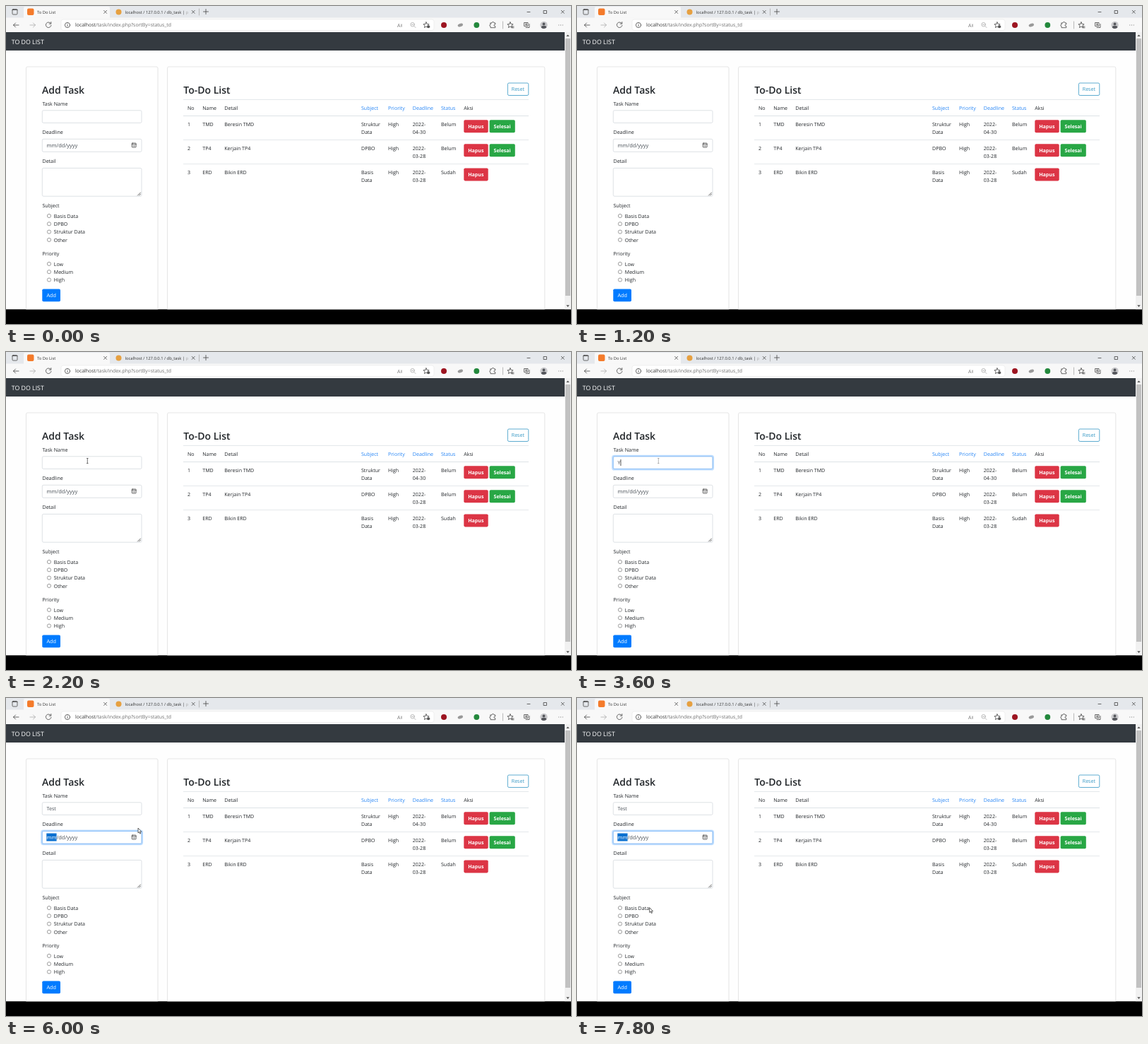
Write an HTML page that moves like this. It is 800x450 px and loops after 8 s.

```html
<!DOCTYPE html>
<html lang="en">
<head>
<meta charset="utf-8">
<title>To Do List</title>
<style>
  html, body { margin: 0; width: 100%; height: 100%; overflow: hidden; background: #000; }
  svg { display: block; width: 100%; height: 100%; }
  text { font: 7.05px "Open Sans", "Noto Sans", sans-serif; fill: #212529; text-rendering: geometricPrecision; white-space: pre; }
  .heading { font-size: 14px; font-weight: 600; }
  .link { fill: #2484f5; }
  .tab { font-size: 5.8px; fill: #333; }
  .url { font-size: 6.9px; fill: #6d6d6d; }
  .brand { font-size: 8.8px; fill: #fff; }
  .value { fill: #495057; }
  .date { font-size: 7.5px; fill: #495057; }
  .button { fill: #fff; font-weight: 700; }
  .line { fill: none; stroke: #444; stroke-width: .8; stroke-linecap: round; stroke-linejoin: round; }
  .pale { stroke: #aaa; }
  .card { fill: #fff; stroke: #dfdfdf; stroke-width: .8; }
  .field { fill: #fff; stroke: #ced4da; stroke-width: .7; }
  .radio { fill: #fff; stroke: #767676; stroke-width: .7; }
  .ring { fill: none; stroke: #007bff; stroke-opacity: .25; stroke-width: 2; }
  .edge { fill: none; stroke: #80bdff; stroke-width: .8; }
</style>
</head>
<body>
<svg viewBox="0 0 800 450" preserveAspectRatio="none">
  <rect width="800" height="429.5" fill="#fefefe"/>

  <g id="tabs">
    <rect width="800" height="17" fill="#e5e8ec"/>
    <path d="M25 17V3q0-2 2-2H145q2 0 2 2V17Z" fill="#f8f8f8"/>
    <rect class="line" x="9" y="4.5" width="7" height="7.5" rx="1.2"/>
    <path d="M9 5.5h7" class="line" stroke-width="1.6"/>
    <rect x="30" y="3.5" width="9.5" height="9.5" rx="2" fill="#f47b2b"/>
    <text class="tab" x="44" y="10.7">To Do List</text>
    <circle cx="159.5" cy="8.5" r="4" fill="#e6a041"/>
    <text class="tab" x="168.5" y="10.7">localhost / 127.0.0.1 / db_task | <tspan fill="#aaa">p</tspan></text>
    <path class="line" d="M138.6 6.4l4 4m0-4l-4 4M263.2 6.4l4 4m0-4l-4 4M279.5 8h7m-3.5-3.5v7"/>
    <path class="line pale" d="M273.5 4v9"/>
    <path class="line" stroke-width=".6" d="M738 8.5h4M761.5 6.5h4v4h-4zM786.3 6.3l4 4m0-4l-4 4"/>
  </g>

  <g id="toolbar">
    <rect y="16.5" width="800" height="21" fill="#f8f8f8"/>
    <rect x="78" y="19" width="528" height="15.5" rx="3" fill="#fff" stroke="#e8e8e8" stroke-width=".6"/>
    <path class="line" d="M18 27h-7.5m3-3l-3 3l3 3M63.3 24.5a3.8 3.8 0 1 0 .7 2.8M63.8 22.6v2.6h-2.6"/>
    <path class="line pale" d="M34 27h7.5m-3-3l3 3l-3 3"/>
    <circle class="line" cx="87" cy="27" r="3.6"/>
    <path class="line" d="M87 26.6v2M87 25v.1"/>
    <text class="url" x="98" y="29.4"><tspan fill="#333">localhost</tspan>/task/index.php?sortBy=status_td</text>
    <text class="url" x="554" y="29.8">A<tspan font-size="5" dy="-1.2">))</tspan></text>
    <circle class="line pale" cx="575.6" cy="26.2" r="2.8"/>
    <path class="line pale" d="M577.8 28.4l2.2 2.2M574.3 26.2h2.6"/>
    <path id="star" class="line" d="M595 22.8l1.2 2.7l2.9.3l-2.2 1.9l.7 2.9l-2.6-1.5l-2.6 1.5l.7-2.9l-2.2-1.9l2.9-.3z"/>
    <circle cx="598.2" cy="29.3" r="2" fill="#555"/>
    <circle cx="620" cy="27" r="4" fill="#9c1420"/>
    <ellipse cx="643.3" cy="27" rx="3.8" ry="2.2" fill="#999" transform="rotate(-20 643.3 27)"/>
    <circle cx="666.3" cy="27" r="3.9" fill="#23883c"/>
    <path class="line" d="M686 24h2q.3-1.6 1.5-1.6T691 24h1.8v2q-1.8 0-1.8 1.3t1.8 1.3v2.1H686v-2.1q-1.2 0-1.2-1.3T686 26z"/>
    <path class="line pale" d="M703.5 22v10"/>
    <use href="#star" x="119"/>
    <path class="line" d="M716 29h3m-3 1.8h3M734 23.5h5v5h-5zM736 30.5h5v-5M736.5 24.8v2.4m-1.2-1.2h2.4"/>
    <circle cx="761.5" cy="27" r="5.2" fill="#c9c9cc"/>
    <circle cx="761.5" cy="25.4" r="1.9" fill="#55575c"/>
    <path d="M757.8 30.5q0-2.7 3.7-2.7t3.7 2.7q-3.7 3-7.4 0" fill="#55575c"/>
    <path class="line" stroke-width="1.3" d="M782.8 27h.1m2.6 0h.1m2.6 0h.1"/>
  </g>

  <rect y="37" width="791" height="26" fill="#343a40"/>
  <text class="brand" x="7.7" y="53.5">TO DO LIST</text>

  <rect class="card" x="28.5" y="86" width="186.5" height="360" rx="2"/>
  <text class="heading" x="51" y="123.8">Add Task</text>
  <text x="51.5" y="141">Task Name</text>
  <rect class="field" x="51.3" y="147.8" width="140.7" height="17.6" rx="1.8"/>
  <text x="51.5" y="181">Deadline</text>
  <rect class="field" x="51.3" y="188.3" width="140.7" height="18" rx="1.8"/>
  <g id="focus">
    <rect class="ring" x="50.2" y="146.7" width="142.9" height="19.8" rx="2.6"/>
    <rect class="edge" x="51.3" y="147.8" width="140.7" height="17.6" rx="1.8"/>
  </g>
  <text id="name" class="value" x="57.6" y="159"></text>
  <path id="caret" d="M0 152v9" stroke="#222" stroke-width=".8"/>
  <rect id="mark" x="57.3" y="191.5" width="14.3" height="11" fill="#0a70d0"/>
  <text class="date" x="57.5" y="199.7"><tspan id="month">mm</tspan>/dd/yyyy</text>
  <rect class="line" x="178.3" y="194" width="5.8" height="6" rx=".7"/>
  <path class="line" d="M178.3 195.7h5.8M180 198h2.5"/>
  <text x="51.5" y="222.4">Detail</text>
  <rect class="field" x="51.3" y="229.4" width="140.7" height="39.8" rx="1.8"/>
  <path class="line" stroke-width=".6" d="M186.5 268l4-4M188.7 268l1.8-1.8"/>
  <text x="51.5" y="285">Subject</text>
  <text x="51.5" y="352.6">Priority</text>
  <g id="radios"></g>
  <rect x="51.3" y="400.5" width="25.7" height="17.7" rx="1.8" fill="#007bff"/>
  <text x="57.4" y="412" style="fill:#fff;font-size:7.3px">Add</text>

  <rect class="card" x="228.5" y="86" width="534.3" height="360" rx="2"/>
  <text class="heading" x="251.3" y="123.8">To-Do List</text>
  <rect x="710.4" y="109" width="29.4" height="17.5" rx="1.8" fill="#fff" stroke="#3597c4" stroke-width=".8"/>
  <text x="715.8" y="120.4" style="fill:#3597c4">Reset</text>
  <path d="M251 132.5H740M251 189.5H740M251 223.6H740" stroke="#dee2e6" stroke-width=".8"/>
  <path d="M251 155.5H740" stroke="#dee2e6" stroke-width="1.2"/>
  <g id="table"></g>

  <rect x="791" y="37" width="9" height="392.5" fill="#f1f1f1"/>
  <rect x="792" y="46" width="7" height="364" fill="#c1c1c1"/>
  <path d="M793.3 43l2.2-2.6l2.2 2.6zM793.3 423.3l2.2 2.6l2.2-2.6z" fill="#555"/>
  <rect y="429.5" width="800" height="20.5"/>

  <path id="beam" d="M-1.2-3.5h2.4M0-3.5v7M-1.2 3.5h2.4" fill="none" stroke="#333" stroke-width=".7"/>
  <path id="arrow" d="M0 0v7l1.6-1.4l1.1 2.5l1.1-.5l-1.1-2.4h2.1z" fill="#fff" stroke="#222" stroke-width=".7"/>
</svg>
<script>
  const byId = id => document.getElementById(id);
  const label = (x, y, text, cls = '') => `<text x="${x}" y="${y}" class="${cls}">${text}</text>`;

  const radios = (y, names) => names.map((name, i) => {
    const cy = y + i * 11.3;
    return `<circle class="radio" cx="61" cy="${cy}" r="2.6"/>` + label(67.8, cy + 2.7, name);
  }).join('');
  byId('radios').innerHTML =
    radios(297, ['Basis Data', 'DPBO', 'Struktur Data', 'Other']) +
    radios(364.9, ['Low', 'Medium', 'High']);

  const columns = [257, 278.3, 309.3, 503, 541, 575.8, 616, 648.3];
  const headers = ['No', 'Name', 'Detail', 'Subject', 'Priority', 'Deadline', 'Status', 'Aksi'];
  const rows = [
    ['1', 'TMD', 'Beresin TMD', 'Struktur|Data', 'High', '2022-|04-30', 'Belum'],
    ['2', 'TP4', 'Kerjain TP4', 'DPBO', 'High', '2022-|03-28', 'Belum'],
    ['3', 'ERD', 'Bikin ERD', 'Basis|Data', 'High', '2022-|03-28', 'Sudah']
  ];
  const button = (x, y, width, color, text) =>
    `<rect x="${x}" y="${y}" width="${width}" height="18" rx="1.8" fill="${color}"/>` +
    label(x + 5.9, y + 11.6, text, 'button');

  const head = headers.map((text, i) => label(columns[i], 146.7, text, i > 2 && i < 7 ? 'link' : ''));
  const body = rows.map((row, r) => {
    const y = 169.6 + r * 34.1;
    const cells = row.map((cell, i) =>
      cell.split('|').map((part, n) => label(columns[i], y + n * 11.2, part)).join(''));
    cells.push(button(648.3, y - 8.4, 34.4, '#dc3545', 'Hapus'));
    if (row[6] === 'Belum') cells.push(button(684.6, y - 8.4, 36.2, '#28a745', 'Selesai'));
    return cells.join('');
  });
  byId('table').innerHTML = head.concat(body).join('');

  // Pointer path: time, x, y
  const path = [
    [1800, 150, 215], [2200, 115.3, 154], [5000, 115.3, 154], [5800, 187, 184],
    [6200, 187, 184], [7200, 106, 283], [7600, 102.7, 296.5], [8000, 102.7, 296.5]
  ];
  const typed = [[3400, ''], [3600, 'Y'], [3800, ''], [4000, 'T'], [4200, 'Te'], [4400, 'Tes'], [4600, 'Test']];

  function pointerAt(t) {
    const i = path.findIndex(p => p[0] > t);
    const [t0, x0, y0] = path[i - 1], [t1, x1, y1] = path[i];
    const u = (t - t0) / (t1 - t0), k = u * u * (3 - 2 * u);
    return [x0 + (x1 - x0) * k, y0 + (y1 - y0) * k];
  }

  const show = (el, on) => el.setAttribute('visibility', on ? 'visible' : 'hidden');
  const within = (v, a, b) => v >= a && v <= b;

  function draw(t) {
    const name = byId('name');
    const entry = typed.filter(([at]) => at <= t).pop();
    name.textContent = entry ? entry[1] : '';
    show(byId('caret'), within(t, 3000, 4600));
    byId('caret').setAttribute('transform', `translate(${58 + (name.textContent ? name.getComputedTextLength() : 0)} 0)`);

    show(byId('focus'), t >= 3000);
    byId('focus').setAttribute('transform', t >= 5000 ? 'translate(0 40.7)' : '');
    show(byId('mark'), t >= 4800);
    byId('month').style.fill = t >= 4800 ? '#fff' : '';

    const visible = t >= path[0][0];
    const [x, y] = visible ? pointerAt(t) : [0, 0];
    const overText = within(x, 51, 192) && (within(y, 148, 165) || within(y, 229, 269));
    for (const id of ['beam', 'arrow']) {
      byId(id).setAttribute('transform', `translate(${x} ${y})`);
      show(byId(id), visible && overText === (id === 'beam'));
    }
    byId('beam').setAttribute('opacity', within(t, 3000, 4900) ? .5 : 1);
  }

  const start = performance.now();
  function tick() {
    const t = (performance.now() - start) % 8000;
    draw(Math.floor(t / 200) * 200);
    requestAnimationFrame(tick);
  }
  tick();
</script>
</body>
</html>
```
